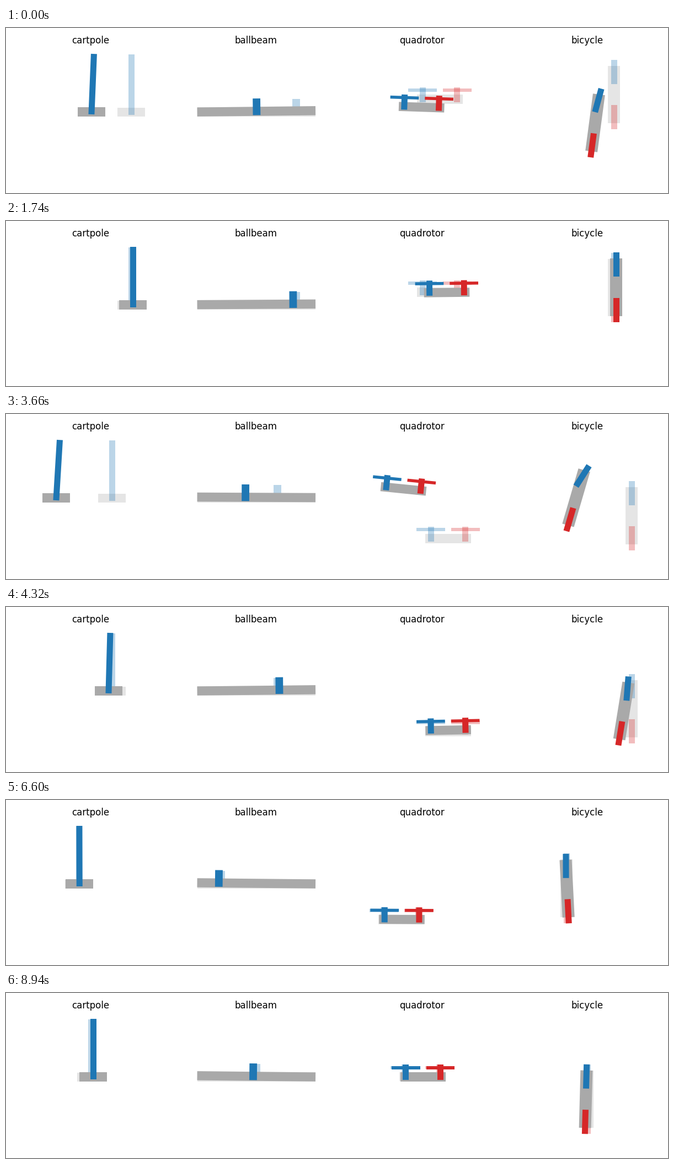
A matplotlib script that plays this animation: 1200 px wide and 300 px high, repeating every 9000 ms.

```python
import numpy as np
import matplotlib.pyplot as plt
from matplotlib.animation import FuncAnimation
from matplotlib.patches import Polygon

W, H, DPI = 1200, 300, 100
FRAMES, SEG = 150, 30
GRAY, BLUE, RED = "darkgray", "tab:blue", "tab:red"
UNIT = 55  # pixels per model unit

# Knots of the unit responses, in steps after a goal change
T = np.array([0, 1, 2, 4, 7, 10, 13, 17, 24, 30], float)


def curve(*v):
    """Smooth cubic Hermite curve through the values at T."""
    v = np.array(v, float)
    m = np.gradient(v, T)

    def at(k):
        j = int(np.clip(np.searchsorted(T, k, side="right") - 1, 0, len(T) - 2))
        h = T[j + 1] - T[j]
        s = (k - T[j]) / h
        return ((1 + 2 * s) * (1 - s) ** 2 * v[j] + s * (1 - s) ** 2 * h * m[j]
                + s * s * (3 - 2 * s) * v[j + 1] + s * s * (s - 1) * h * m[j + 1])
    return at


def track(step, rest):
    """Move from one rest value to the next along a step response."""
    return lambda i, k: rest[i] + (rest[i + 1] - rest[i]) * step(k)


def pulse(shape, amps):
    return lambda i, k: amps[i] * shape(k)


def total(*parts):
    return lambda i, k: sum(p(i, k) for p in parts)


cart_step = curve(0, .01, .04, .23, .67, .83, .885, .90, .97, 1)
ball_step = curve(0, .005, .02, .14, .71, 1.03, 1.157, 1.19, 1.08, 1)
quad_step = curve(0, .04, .12, .51, .83, .88, .90, .93, .97, 1)
lift_step = curve(0, .13, .30, .585, .87, .95, .98, .985, .995, 1)
side_step = curve(0, .03, .11, .27, .64, .79, .868, .943, .985, 1)
ride_step = curve(0, .12, .30, .60, .72, 1.06, 1.02, 1, 1, 1)

lean = curve(0, .3, .62, 1, .85, .5, .28, .1, .03, 0)
tip = curve(0, -.2, -.4, -1, -1.4, -.2, 1, .8, .3, 0)
roll = curve(0, .8, 1, .3, -.3, -.26, -.2, -.12, -.03, 0)
yaw = curve(0, .4, .8, 1, .8, .62, .45, .25, .08, 0)
steer = curve(0, .6, .8, .8, -.07, -.2, -.225, -.2, -.07, 0)
YAW = [.165, -.26, .355, -.37, .113]


def box(x, y, w, h):
    """Corners of a box centred at (x, y), in model units."""
    return UNIT * np.array([(x + a * w / 2, y + b * h / 2)
                            for a, b in ((-1, -1), (1, -1), (1, 1), (-1, 1))])


def turn(pts, a):
    c, s = np.cos(a), np.sin(a)
    return pts @ np.array([[c, s], [-s, c]])


def cartpole(x, a, y=152.4):
    return [(GRAY, box(0, 0, .9, .3) + (x, y)),
            (BLUE, turn(box(0, -50 / UNIT, .2, 2), a) + (x, y - .4))]


def ballbeam(x, a, y=151.5):
    mid = 453.8
    return [(GRAY, turn(box(0, 0, 3.9, .3), -a) + (mid, y)),
            (BLUE, turn(box((x - mid) / UNIT, -.15, .25, .55), -a) + (mid, y))]


def quadrotor(x, y, a):
    parts = [(GRAY, box(0, 0, 1.5, .3))]
    for sx, color in ((-.57, BLUE), (.57, RED)):
        parts += [(color, box(sx, -.15, .2, .5)), (color, box(sx, -.3, .94, .1))]
    return [(c, turn(p, a) + (x, y)) for c, p in parts]


def bicycle(x, y, a, d):
    front = turn(box(0, 0, .2, .8), d) + (0, -.75 * UNIT)
    parts = [(GRAY, box(0, 0, .4, 1.9)), (BLUE, front),
             (RED, box(0, .75, .2, .8))]
    return [(c, turn(p, a) + (x, y)) for c, p in parts]


# name, shape builder, live tracks, goal poses
SYSTEMS = [
    ("cartpole", cartpole,
     [track(cart_step, [152, 230, 86.7, 199, 129, 158]),
      pulse(lean, [.066, -.1, .097, -.065, .022])],
     [(x, 0, 153) for x in (227, 95, 192, 132, 154)]),
    ("ballbeam", ballbeam,
     [track(ball_step, [453, 520.5, 433, 487, 398, 448]),
      total(track(ball_step, [.016, .006, -.001, .001, -.001, -.0105]),
            pulse(tip, [.0115, -.0116, .0092, -.0167, .0083]))],
     [(x, 0, 152.4) for x in (526, 427, 492, 390, 454)]),
    ("quadrotor", quadrotor,
     [track(quad_step, [747, 799, 708, 812, 713, 756]),
      track(lift_step, [150, 130, 97.5, 226.5, 217, 152.3]),
      total(track(quad_step, [0, -.012, 0, 0, 0, 0]),
            pulse(roll, [.035, -.1, .1, -.093, .04]))],
     [(786.5, 129.5, 0), (715, 96.7, 0), (801.5, 226.7, 0),
      (716.3, 217.3, 0), (754.3, 152.2, 0)]),
    ("bicycle", bicycle,
     [track(side_step, [1063.3, 1106, 1021, 1135, 1014, 1051]),
      track(ride_step, [194.8, 120.5, 137, 188, 161, 193]),
      total(track(side_step, [0, 0, 0, 0, 0, .026]), pulse(yaw, YAW)),
      pulse(steer, YAW)],
     [(1102, 121.2, 0, 0), (1023, 137.2, 0, 0), (1134.3, 185, 0, 0),
      (1016, 160.7, 0, 0), (1054.3, 193.2, 0, 0)]),
]

fig = plt.figure(figsize=(W / DPI, H / DPI), dpi=DPI, facecolor="white")
ax = fig.add_axes([0, 0, 1, 1])
ax.set_xlim(0, W)
ax.set_ylim(H, 0)
ax.axis("off")


def add(shapes, alpha):
    return [ax.add_patch(Polygon(p, closed=True, facecolor=c, alpha=alpha, linewidth=0))
            for c, p in shapes]


def place(patches, shapes):
    for patch, (_, pts) in zip(patches, shapes):
        patch.set_xy(pts)


ghosts, bodies = [], []
for col, (name, build, tracks, goals) in enumerate(SYSTEMS):
    ax.text(153.5 + 300 * col, 27.7, name, fontsize=12, ha="center",
            va="baseline", family="DejaVu Sans")
    ghosts.append(add(build(*goals[0]), .3))
    bodies.append(add(build(*(t(0, 0) for t in tracks)), 1))


def update(n):
    i, r = divmod(n, SEG)
    # the first run starts one step into its response
    k = 2 + r * 28 / 29 if i == 0 else r + 1
    for (_, build, tracks, goals), ghost, body in zip(SYSTEMS, ghosts, bodies):
        place(ghost, build(*goals[i]))
        place(body, build(*(t(i, k) for t in tracks)))
    return [p for group in ghosts + bodies for p in group]


anim = FuncAnimation(fig, update, frames=FRAMES, interval=60, repeat=True,
                     repeat_delay=0, blit=False)
plt.show()
```
